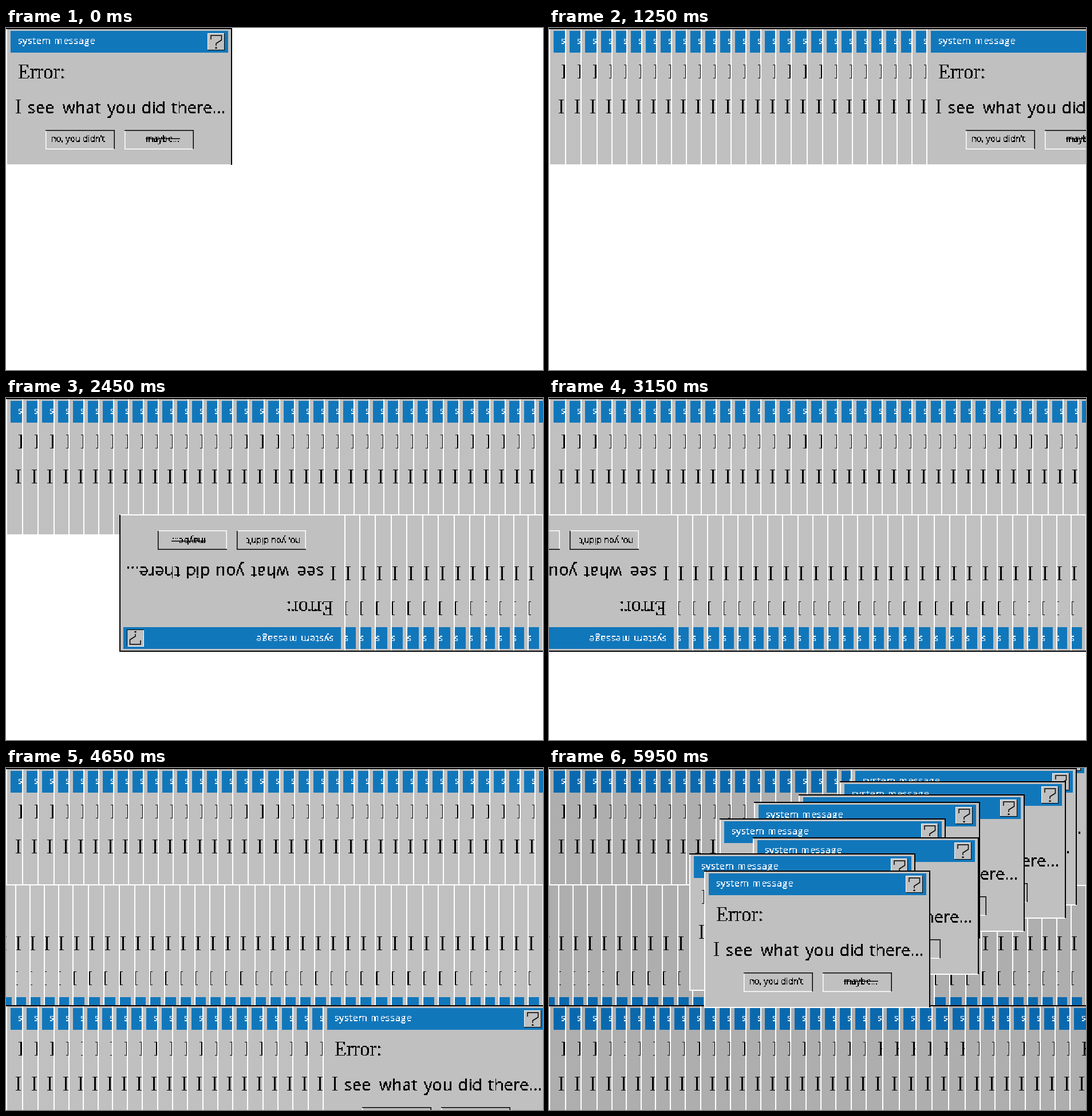
An HTML page with a canvas for the animation above (6 s loop, 938 by 597 pixels).

```html
<!DOCTYPE html>
<html lang="en">
<head>
<meta charset="utf-8">
<title>System message</title>
<style>
  html, body { margin: 0; width: 100%; height: 100%; overflow: hidden; background: #fff; }
  canvas { display: block; }
</style>
</head>
<body>
<canvas id="stage" width="938" height="597"></canvas>
<script>
const STEP = 50, LOOP = 6000;
const W = 395, H = 240;
const DOT = 1.45; // size of one text pixel
const SANS = '"Open Sans", "Noto Sans", sans-serif';
const SERIF = '"Liberation Serif", "Noto Serif", serif';
const ctx = document.getElementById('stage').getContext('2d');

function makeCanvas(w, h) {
  const c = document.createElement('canvas');
  c.width = Math.ceil(w);
  c.height = Math.ceil(h);
  return c;
}

// Text drawn small with hard edges, enlarged later for a pixel look
function textLayer() {
  const c = makeCanvas(W / DOT, H / DOT);
  const g = c.getContext('2d', { willReadFrequently: true });
  const snap = v => Math.round(v / DOT);

  function write(text, x, y, size, family = SANS, color = '#000', spacing = 0) {
    g.font = `${size / DOT}px ${family}`;
    g.letterSpacing = spacing / DOT + 'px';
    g.fillStyle = color;
    g.fillText(text, snap(x), snap(y));
  }

  write('system message', 21, 28, 16.5, SANS, '#fff', 0.7);
  write('Error:', 20, 89, 35, SERIF);
  write('I', 16.5, 149, 36, SERIF);
  const words = { see: 37, what: 99, you: 177, did: 237, 'there...': 288 };
  for (const word in words) write(word, words[word], 149, 29);
  write('no, you didn’t', 79, 199, 15);
  write('maybe...', 244, 199, 15);

  const img = g.getImageData(0, 0, c.width, c.height);
  for (let i = 3; i < img.data.length; i += 4) img.data[i] = img.data[i] > 100 ? 255 : 0;
  g.putImageData(img, 0, 0);
  return c;
}

function makeWindow(gray, blue, text) {
  const c = makeCanvas(W, H);
  const g = c.getContext('2d');
  const box = (color, x, y, w, h) => {
    g.fillStyle = color;
    g.fillRect(x, y, w, h);
  };

  // Light on the left and bottom, dark on the top and right
  const bevel = (x, y, w, h, t) => {
    box('#fff', x, y, t, h);
    box('#fff', x, y + h - t, w, t);
    box('#000', x, y, w, t);
    box('#000', x + w - t, y, t, h - t / 2);
  };

  box(gray, 0, 0, W, H);
  bevel(0, 0, W, H, 2);
  box(blue, 8, 5, 380, 38);

  // Help button
  box('#000', 352, 9, 30, 30);
  box('#fff', 352, 9, 29, 29);
  box(gray, 353, 10, 28, 28);
  g.lineWidth = 1.5;
  g.beginPath();
  g.moveTo(358, 20);
  g.lineTo(358, 13);
  g.lineTo(376.5, 13);
  g.lineTo(376.5, 21);
  g.lineTo(367, 27);
  g.lineTo(367, 31);
  g.stroke();
  box('#000', 365.5, 33.5, 3, 2.5);

  bevel(69, 178, 121, 34, 1.5);
  bevel(207, 178, 121, 34, 1.5);

  g.imageSmoothingEnabled = false;
  g.drawImage(text, 0, 0, text.width * DOT, text.height * DOT);
  box('#000', 244, 192.5, 60, 1.5);
  return c;
}

const text = textLayer();
const bright = makeWindow('#c0c0c0', '#1177bb', text);
const dim = makeWindow('#aeaeae', '#0a69ae', text);

// Even steps between key points, each [index, ...values]
function along(keys) {
  const last = keys[keys.length - 1][0];
  return Array.from({ length: last + 1 }, (_, i) => {
    const k = Math.max(1, keys.findIndex(key => key[0] >= i));
    const [a, ...from] = keys[k - 1];
    const [b, ...to] = keys[k];
    return from.map((v, j) => Math.round(v + (to[j] - v) * (i - a) / (b - a)));
  });
}

const row = (y, flip, keys) => along(keys).map(([x]) => ({ x, y, flip }));

const rows = [
  ...row(0, false, [[0, 0], [3, 83], [15, 395], [18, 477], [29, 763], [33, 871], [35, 923]]),
  ...row(443, true, [[0, 939], [5, 811], [12, 619], [27, 226], [31, 118], [35, 18]]),
  ...row(414, false, [[0, 0], [3, 83], [8, 211], [21, 553], [27, 726], [34, 909]])
];

const cascade = along([
  [0, 872, -197], [4, 547, -34], [5, 527, 0], [6, 508, 23], [7, 436, 46],
  [8, 358, 59], [9, 298, 88], [10, 356, 121], [11, 245, 149], [12, 271, 179]
]).map(([x, y]) => ({ x, y }));

function put(sprite, { x, y, flip }) {
  const d = flip ? -1 : 1;
  ctx.setTransform(d, 0, 0, d, x, y);
  ctx.drawImage(sprite, 0, 0);
}

function draw(step) {
  ctx.setTransform(1, 0, 0, 1, 0, 0);
  ctx.fillStyle = '#fff';
  ctx.fillRect(0, 0, 938, 597);
  const open = step + 1;
  const base = open > rows.length ? dim : bright;
  rows.slice(0, open).forEach(w => put(base, w));
  cascade.slice(0, Math.max(0, open - rows.length)).forEach(w => put(bright, w));
}

let shown = -1;
const start = performance.now();
function tick() {
  const step = Math.floor(((performance.now() - start) % LOOP) / STEP);
  if (step !== shown) draw(shown = step);
  requestAnimationFrame(tick);
}
tick();
</script>
</body>
</html>
```
